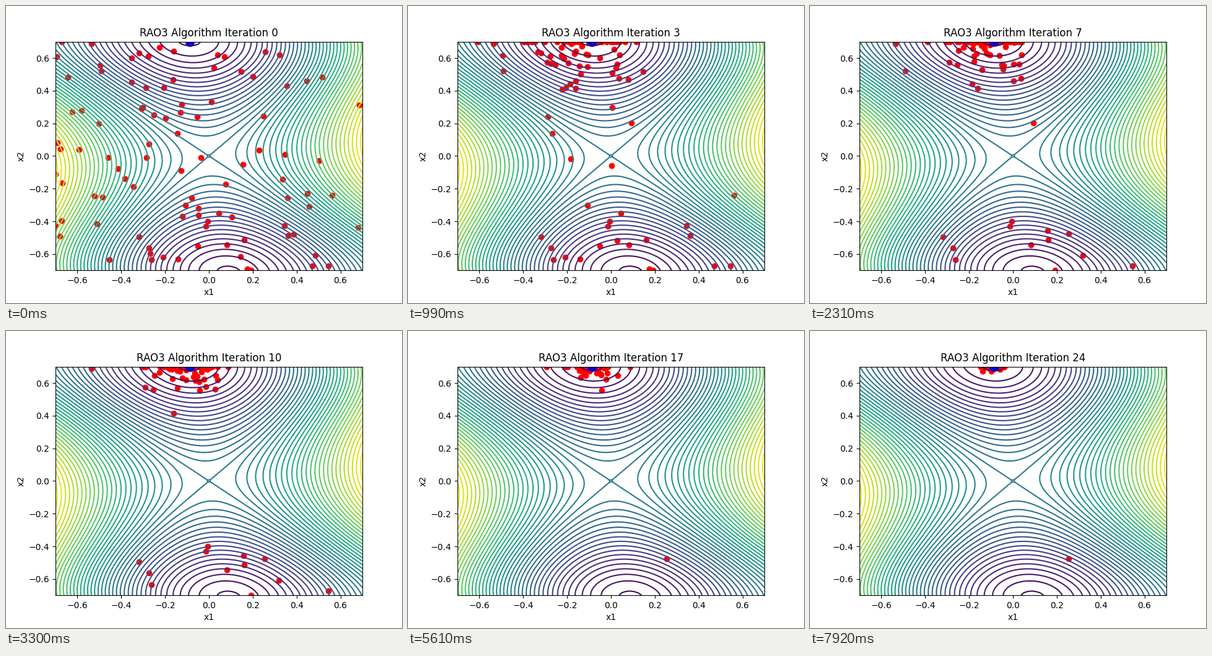
Write a matplotlib script that moves like this. It is 640 px wide and 480 px high and loops after 8 s.

```python
import numpy as np
import matplotlib.pyplot as plt
from matplotlib.animation import FuncAnimation

LOOP, STEP, HOLD = 8000, 40, 330   # ms
ITERS = 25
LIM = 0.7
BEST = np.array([-0.0885, 0.7])

# Candidates stuck in the lower basin: x1, x2, first iteration, end iteration
STUCK = np.array([
    (-0.319, -0.495, 0, 15), (-0.274, -0.563, 0, 14), (-0.006, -0.400, 0, 12),
    (-0.014, -0.430, 0, 13), (0.161, -0.514, 0, 15), (0.082, -0.544, 0, 14),
    (0.545, -0.673, 0, 12), (0.254, -0.476, 7, ITERS), (0.158, -0.457, 7, 15),
    (0.319, -0.609, 7, 13)])


def camel(x, y):
    """Six-hump camel function."""
    return (4 - 2.1 * x**2 + x**4 / 3) * x**2 + x * y + (4 * y**2 - 4) * y**2


def swarm(n=90, seed=5):
    """Positions per iteration: moves are kept only where they improve."""
    rng = np.random.default_rng(seed)
    u = rng.random((n, 2))
    u[:, 0] **= 1.3                # the start is denser on the left
    pos = LIM * (2 * u - 1)
    path = []
    for it in range(ITERS):
        if it > 1:
            # the search cloud narrows around the optimum
            spread = np.array([0.25 * np.exp(-it / 12), 0.6 * np.exp(-it / 7)])
            trial = BEST + spread * (rng.normal(size=(n, 2)) - 0.3)
            trial = trial.clip(-LIM, LIM)
            tries = rng.random(n) < max(0.4, 0.9 - 0.08 * it)
            better = tries & (camel(*trial.T) < camel(*pos.T))
            pos = np.where(better[:, None], trial, pos)
        held = STUCK[(STUCK[:, 2] <= it) & (it < STUCK[:, 3]), :2]
        path.append(np.vstack([pos, held]))
    return path


fig, ax = plt.subplots(figsize=(6.4, 4.8), dpi=100)
grid = np.linspace(-LIM, LIM, 100)
X, Y = np.meshgrid(grid, grid)
ax.contour(X, Y, camel(X, Y), 50, cmap="viridis")
dots = ax.scatter([], [], color="red")
ax.scatter(*BEST, color="blue", s=100)
ax.set(xlim=(-LIM, LIM), ylim=(-LIM, LIM), xlabel="x1", ylabel="x2")
title = ax.set_title("")
path = swarm()


def update(k):
    it = ((k + 1) * STEP - 1) // HOLD
    dots.set_offsets(path[it])
    title.set_text(f"RAO3 Algorithm Iteration {it}")
    return dots, title


anim = FuncAnimation(fig, update, frames=LOOP // STEP, interval=STEP,
                     repeat=True, repeat_delay=0)
plt.show()
```
